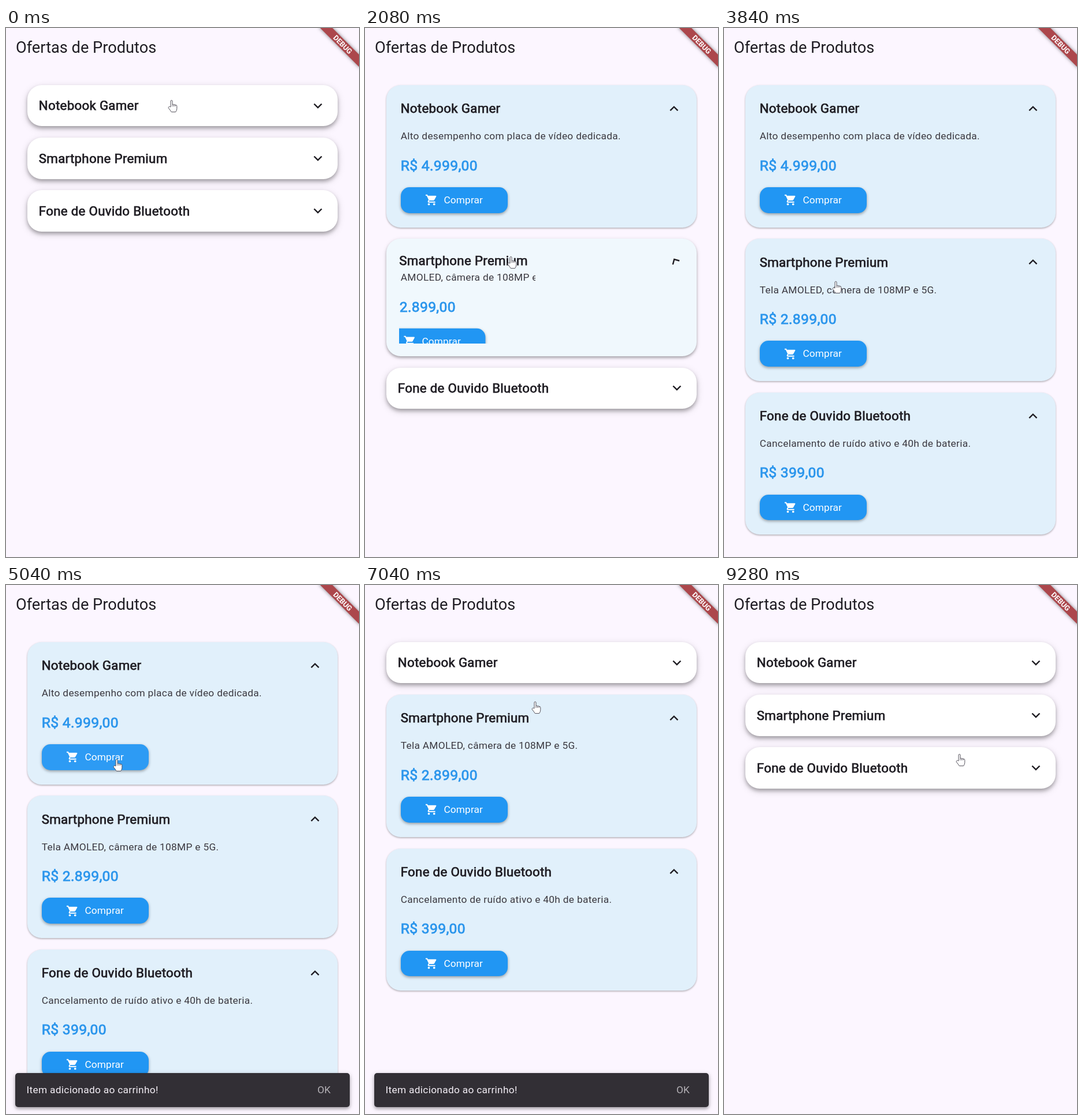
Animation of 611x917 px, one loop 9360 ms. Source, as an HTML page:

```html
<!DOCTYPE html>
<html lang="pt-BR">
<head>
<meta charset="utf-8">
<title>Ofertas de Produtos</title>
<style>
  html, body { margin: 0; width: 100%; height: 100%; overflow: hidden; }
  body {
    position: relative; background: #fcf6ff; color: #1f1d23;
    font: 17.3px/24.7px Roboto, sans-serif; letter-spacing: .31px; white-space: nowrap;
  }
  h1 { position: absolute; left: 17px; top: 14px; margin: 0; font-size: 27.2px; font-weight: 400; line-height: 40px; letter-spacing: 0; }
  #list { position: absolute; left: 37px; top: 99px; width: 537px; }
  .card { box-sizing: border-box; margin-bottom: 19.8px; border-radius: 24.7px; }
  .head { display: flex; justify-content: space-between; align-items: center; height: 31.8px; }
  .title { font-size: 22.25px; -webkit-text-stroke: .75px; }
  .chevron { width: 29.7px; height: 29.7px; fill: #1f1d23; }
  .clip { position: relative; }
  .body { position: absolute; left: 0; top: 0; }
  .desc { padding-top: 19.8px; color: #3b3940; }
  .price { margin: 20.6px 0 20.2px; font-size: 24.7px; line-height: 35.3px; color: #2a95ec; -webkit-text-stroke: .8px; }
  .buy {
    display: flex; align-items: center; justify-content: center; gap: 9.9px;
    width: 185px; height: 44.5px; border-radius: 15px; background: #2196f3; color: #fff;
    letter-spacing: .12px; box-shadow: 0 2px 5px rgba(0,0,0,.36);
  }
  .buy svg { width: 22.2px; height: 22.2px; }
  #snack {
    position: absolute; left: 16px; top: 846px; width: 579px; height: 59px; box-sizing: border-box;
    display: flex; align-items: center; justify-content: space-between; padding: 0 33px 0 19.5px;
    border-radius: 5px; background: #322f35; color: #f3eef5;
    box-shadow: 0 3px 5px rgba(0,0,0,.25), 0 2px 10px rgba(0,0,0,.16);
  }
  #snack b { font-weight: 400; letter-spacing: .1px; color: #b5b2b7; }
  #banner {
    position: absolute; left: 533px; top: 21.2px; width: 100px; height: 14.6px;
    transform: rotate(45deg); background: #ac474c; color: #fff; text-align: center;
    font-size: 12.6px; font-weight: 700; line-height: 15px; letter-spacing: 0;
    box-shadow: 0 0 6px rgba(0,0,0,.5);
  }
  #hand { position: absolute; left: -8px; top: -11px; width: 17px; height: 23px; }
</style>
</head>
<body>
<h1>Ofertas de Produtos</h1>
<div id="list"></div>
<div id="snack"><span>Item adicionado ao carrinho!</span><b>OK</b></div>
<div id="banner">DEBUG</div>
<svg id="hand" viewBox="0 0 17 23">
  <path d="M5 13V3q0-1.7 1.5-1.7T8 3v5.5q1.3-.8 2.5.4 1.5-.7 2.5.5 2.8-.2 2.8 2.2v4q0 3-2.2 6H6.3Q4 18 1.2 14.7.7 13 2.3 12.3 3.8 12 5 13z"
    fill="#fff" stroke="#55525c" stroke-width="1" stroke-linejoin="round"/>
  <path d="M8 8.5V12M10.5 9v3M13 9.5V12" fill="none" stroke="#55525c" stroke-width=".9"/>
</svg>
<script>
const LOOP = 9360, STEP = 80;
const PAD_CLOSED = 19.8, PAD_OPEN = 24.7, HEAD = 31.8, BODY = 165.4;

const products = [
  { name: 'Notebook Gamer', desc: 'Alto desempenho com placa de vídeo dedicada.', price: '4.999,00', open: 835, close: 6455 },
  { name: 'Smartphone Premium', desc: 'Tela AMOLED, câmera de 108MP e 5G.', price: '2.899,00', open: 1880, close: 7495 },
  { name: 'Fone de Ouvido Bluetooth', desc: 'Cancelamento de ruído ativo e 40h de bateria.', price: '399,00', open: 3425, close: 8615 }
];

// time, x, y of the pointer
const pointerPath = [
  [0, 288, 135], [1120, 288, 135], [1440, 254, 406], [2320, 254, 406], [2480, 250, 664],
  [3600, 250, 664], [3840, 195, 449], [4000, 193, 350], [4240, 193, 312], [5920, 193, 312],
  [6000, 310, 145], [6720, 310, 145], [7040, 296, 212], [7760, 296, 212], [8080, 306, 299],
  [9040, 306, 299], [9280, 409, 303], [LOOP, 409, 303]
];

const clamp = v => Math.min(1, Math.max(0, v));
const mix = (a, b, p) => a + (b - a) * p;

// cubic-bezier(.42, 0, .58, 1)
function easeInOut(x) {
  if (x <= 0 || x >= 1) return clamp(x);
  let lo = 0, hi = 1, u;
  for (let i = 0; i < 24; i++) {
    u = (lo + hi) / 2;
    const at = 3 * (1 - u) * (1 - u) * u * .42 + 3 * (1 - u) * u * u * .58 + u * u * u;
    if (at < x) lo = u; else hi = u;
  }
  return u * u * (3 - 2 * u);
}

const cartIcon = `<svg viewBox="0 0 24 24" fill="#fff">
  <circle cx="7" cy="20" r="2"/><circle cx="17" cy="20" r="2"/>
  <path d="M1 2h3.3l.9 2H20q1.5.2.9 1.5L17.3 12q-.6 1-1.8 1H8.1l-.9 1.6q0 .4.3.4H19v2H7q-2.5-.3-1.8-3l1.4-2.4L3 4H1z"/></svg>`;

const list = document.getElementById('list');
const cards = products.map(item => {
  const el = document.createElement('div');
  el.className = 'card';
  el.innerHTML = `<div class="head"><span class="title">${item.name}</span>
    <svg class="chevron" viewBox="0 0 24 24"><path d="M16.6 8.6 12 13.2 7.4 8.6 6 10l6 6 6-6z"/></svg></div>
    <div class="clip"><div class="body"><div class="desc">${item.desc}</div>
    <div class="price">R$ ${item.price}</div><div class="buy">${cartIcon}<span>Comprar</span></div></div></div>`;
  list.append(el);
  const find = name => el.querySelector('.' + name);
  const body = find('body');
  return { ...item, el, body, clip: find('clip'), chevron: find('chevron'), buy: find('buy'), width: body.offsetWidth };
});
const snack = document.getElementById('snack');
const hand = document.getElementById('hand');

function drawCard(card, t) {
  const closing = t >= card.close;
  const since = t - (closing ? card.close : card.open);
  const toward = p => closing ? 1 - p : p;
  const frame = toward(easeInOut(since / 400));
  const size = toward(easeInOut(since / 300));
  const turn = toward(clamp(since / 240));

  const pad = mix(PAD_CLOSED, PAD_OPEN, frame);
  const s = card.el.style;
  s.padding = pad + 'px';
  s.height = 2 * pad + HEAD + BODY * size + 'px';
  s.background = `rgb(${mix(255, 225, frame)},${mix(255, 240, frame)},${mix(255, 251, frame)})`;
  s.boxShadow = `0 ${mix(4, 1.5, frame)}px ${mix(6, 3, frame)}px rgba(0,0,0,${mix(.27, .26, frame)}),
    0 ${mix(4, 1, frame)}px ${mix(14, 4, frame)}px rgba(0,0,0,${mix(.15, .06, frame)})`;
  card.chevron.style.transform = `rotate(${180 * turn}deg)`;

  const moving = size < 1;
  card.clip.style.width = card.width * size + 'px';
  card.clip.style.height = BODY * size + 'px';
  card.clip.style.overflow = moving ? 'hidden' : 'visible';
  card.body.style.visibility = closing || size === 0 ? 'hidden' : 'visible';
  card.body.style.transform = moving
    ? `translate(${card.width * (size - 1) / 2}px, ${BODY * (size - 1) / 2}px)` : 'none';
}

function drawPointer(t) {
  const i = pointerPath.findIndex(k => k[0] > t);
  const [t0, x0, y0] = pointerPath[i - 1], [t1, x1, y1] = pointerPath[i];
  const p = (t - t0) / (t1 - t0);
  hand.style.transform = `translate(${mix(x0, x1, p)}px, ${mix(y0, y1, p)}px)`;
}

function draw(t) {
  cards.forEach(card => drawCard(card, t));
  const pressed = t >= 4720 && t < 4960, hovered = t >= 4160 && t < 6000;
  cards[0].buy.style.backgroundColor = pressed ? '#42a5f5' : hovered ? '#2d9bf4' : '#2196f3';
  snack.style.opacity = clamp((t - 4900) / 140) * clamp((9240 - t) / 220);
  drawPointer(t);
}

const start = performance.now();
function tick() {
  const t = (performance.now() - start + 1) % LOOP;
  draw(Math.floor(t / STEP) * STEP);
  requestAnimationFrame(tick);
}
tick();
</script>
</body>
</html>
```
